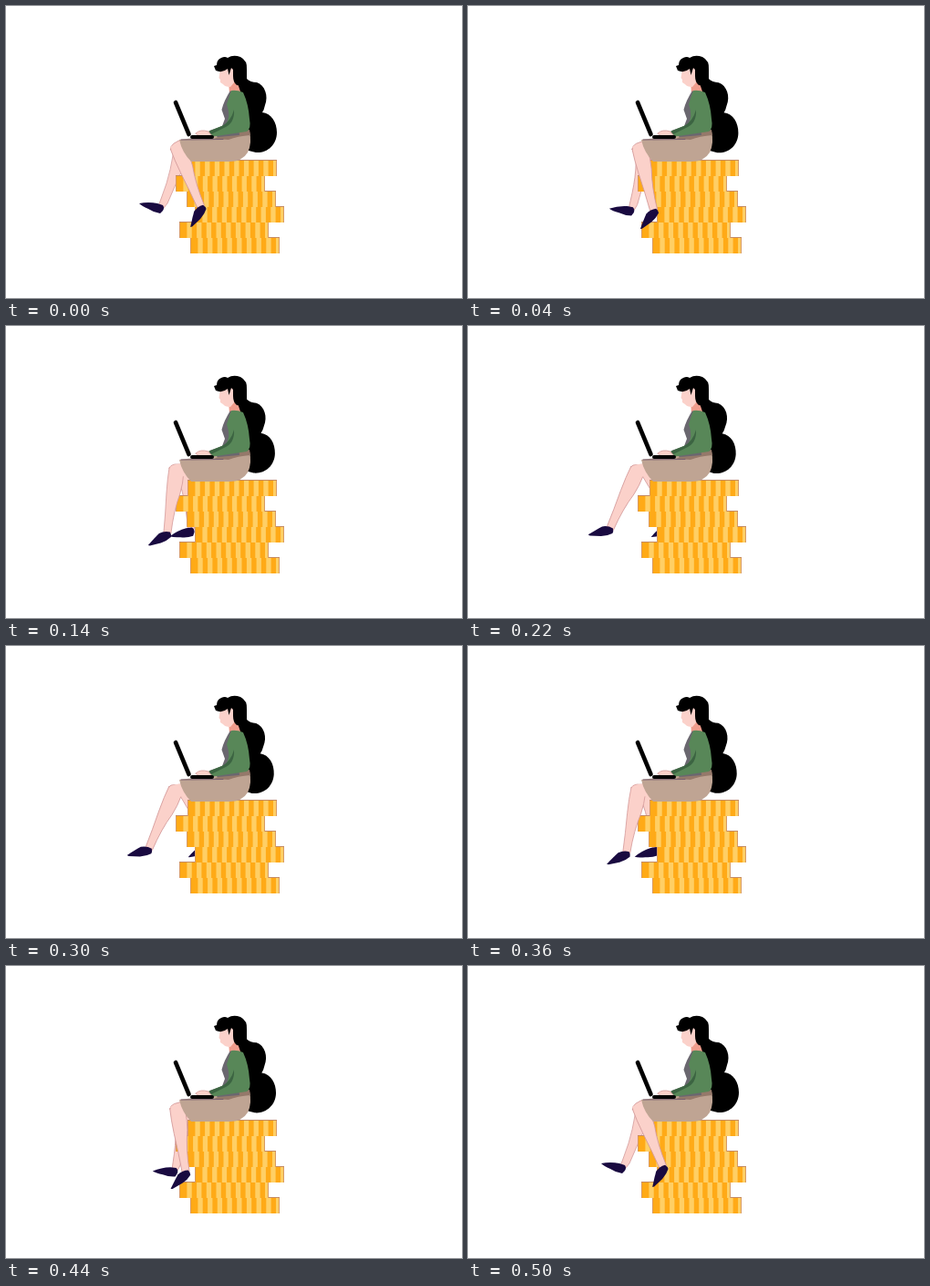
Animation of 500x321 px, one loop 520 ms. Source, as an HTML page with a canvas:

```html
<!DOCTYPE html>
<html lang="en">
<head>
<meta charset="utf-8">
<title>Working on a stack of coins</title>
<style>
  html, body { margin: 0; width: 100%; height: 100%; overflow: hidden; background: #fff; }
  canvas { display: block; }
</style>
</head>
<body>
<canvas id="stage" width="500" height="321"></canvas>
<script>
const ctx = document.getElementById('stage').getContext('2d');
const LOOP = 520, STEP = 20, TURN = 260, BACK = 500;
const SKIN = '#fbd1ca', SHADE = '#ef9c8c', SHOE = '#190a40', OUTLINE = '#d49a9a';
const COIN_LEFTS = [199, 186, 198, 207, 190, 202];

function fill(path, color, line) {
  const shape = new Path2D(path);
  ctx.fillStyle = color;
  ctx.fill(shape);
  if (line) {
    ctx.strokeStyle = line;
    ctx.lineWidth = 0.8;
    ctx.stroke(shape);
  }
}

function line(path, color, width) {
  ctx.strokeStyle = color;
  ctx.lineWidth = width;
  ctx.lineCap = 'round';
  ctx.stroke(new Path2D(path));
}

function turned(x, y, degrees, draw) {
  ctx.save();
  ctx.translate(x, y);
  ctx.rotate(degrees * Math.PI / 180);
  ctx.translate(-x, -y);
  draw();
  ctx.restore();
}

// 0 at the start pose, 1 at the far end of the swing, linear both ways
function swing(t) {
  return t < TURN ? t / TURN : Math.max(0, (BACK - t) / (BACK - TURN));
}

function farLeg(s) {
  turned(193, 153, -49.5 * s, () => {
    fill('M186 151 L200 152 L199 168 Q195 178 190 187 L177 217 L173 222 L167 220 L170 212 Q177 194 180 180 Z', SKIN, OUTLINE);
    fill('M146 217 Q156 215 166 217 L172 219 Q174 222 172 225 L169 228 Q162 227 156 223 Q149 220 146 217 Z', SHOE);
  });
}

function nearLeg(s) {
  turned(183, 154, 54.8 * s - 29.4, () => {
    fill('M179 156 Q180 153 185 152 L193 152 L195 160 Q194 174 191 184 Q184 203 181 228 L173 228 Q175 206 176 184 Q177 168 179 156 Z', SKIN, OUTLINE);
    fill('M156 241 Q163 233 168 228 Q174 225 180 226.5 Q182 230 181 232 Q177 236 170 238.5 L158 241.5 Z', SHOE);
  });
}

function coin(x, y) {
  const width = 98, height = 17, pitch = 10.7;
  ctx.fillStyle = '#c48a62';
  ctx.fillRect(x, y - 1, width, 1);
  ctx.fillStyle = '#ffaa17';
  ctx.fillRect(x, y, width, height);
  ctx.fillStyle = '#ffcf65';
  for (let left = 8.4; left < width; left += pitch) {
    ctx.fillRect(x + left, y, Math.min(5.3, width - left), height);
  }
  ctx.fillStyle = '#d89a62';
  ctx.fillRect(x, y, 1, height);
  ctx.fillRect(x + width - 1, y, 1, height);
}

// Bottom up, so that each coin hides the rim below it
function coins() {
  for (let row = COIN_LEFTS.length - 1; row >= 0; row--) coin(COIN_LEFTS[row], 170 + row * 17);
}

function ponytail(s) {
  turned(252, 70, 3.2 * s, () => {
    fill('M248 60 L263 66 L264 80 Q268 84 275 84 C284 87 288 99 284 109 Q283 114 281 117 C291 118 297 128 297 139 C297 153 286 162 274 161 L262 158 L255 120 L250 90 Z', '#000');
  });
}

function head() {
  fill('M244 83 L253 82 L258 97 L245 96 Z', SHADE);
  fill('M235 69 L249 65 L251 83 L246 89 Q240 89 238 86 L235 84 L235 81 L233.5 79 Z', SKIN);
  fill('M228 66 L231 65 Q231 59 236 57 Q240 55 243 57 Q249 53 257 56 Q265 60 264 70 L264 82 L260 88 L253 87 Q249 84 249 77 L249 70 L247 68 L244.5 76 L243 69 Q237 74 230 71 Z', '#000');
  fill('M246 71 Q249 69 249 75 Q249 80 246 81 Z', SKIN);
}

function torso() {
  fill('M246 93 Q239 104 236.5 114 L240 124 L237 132 L223 137 L232 144 L256 142 L252 100 Z', '#6a676f');
  fill('M247 93 Q253 92 260 95 Q266 108 267 124 Q269 135 264 138 L224 144 L222 138 L241 130 Q247 122 242 108 Z', '#588758');
  fill('M222 138 L237 132 Q247 126 250 114 Q251 129 239 134 L225 141 Z', '#3c6442');
}

function woman() {
  fill('M180 155 Q184 152 192 151 L197 165 L188 166 Z', SKIN);
  fill('M190 147 L240 141 L267 138 Q270 151 265 161 Q259 171 245 171 L203 171 Q193 161 190 147 Z', '#bfa493');
  fill('M228 146 L243 139 L267 136 L268 142 Q254 143 244 147 Z', '#95796a');
  line('M192 147 L238 146.5', '#765c6d', 1);
  head();
  torso();
  fill('M208 140 Q213 135 222 138 L226 143 L213 143 Z', SKIN, OUTLINE);
  line('M186 106 L200.5 141', '#000', 4.6);
  line('M204 144 L226 144', '#000', 4);
}

function draw(t) {
  const s = swing(t);
  ctx.fillStyle = '#fff';
  ctx.fillRect(0, 0, 500, 321);
  farLeg(s);
  coins();
  ponytail(s);
  nearLeg(s);
  woman();
}

function tick() {
  draw(Math.floor((performance.now() % LOOP) / STEP) * STEP);
  requestAnimationFrame(tick);
}
tick();
</script>
</body>
</html>
```
